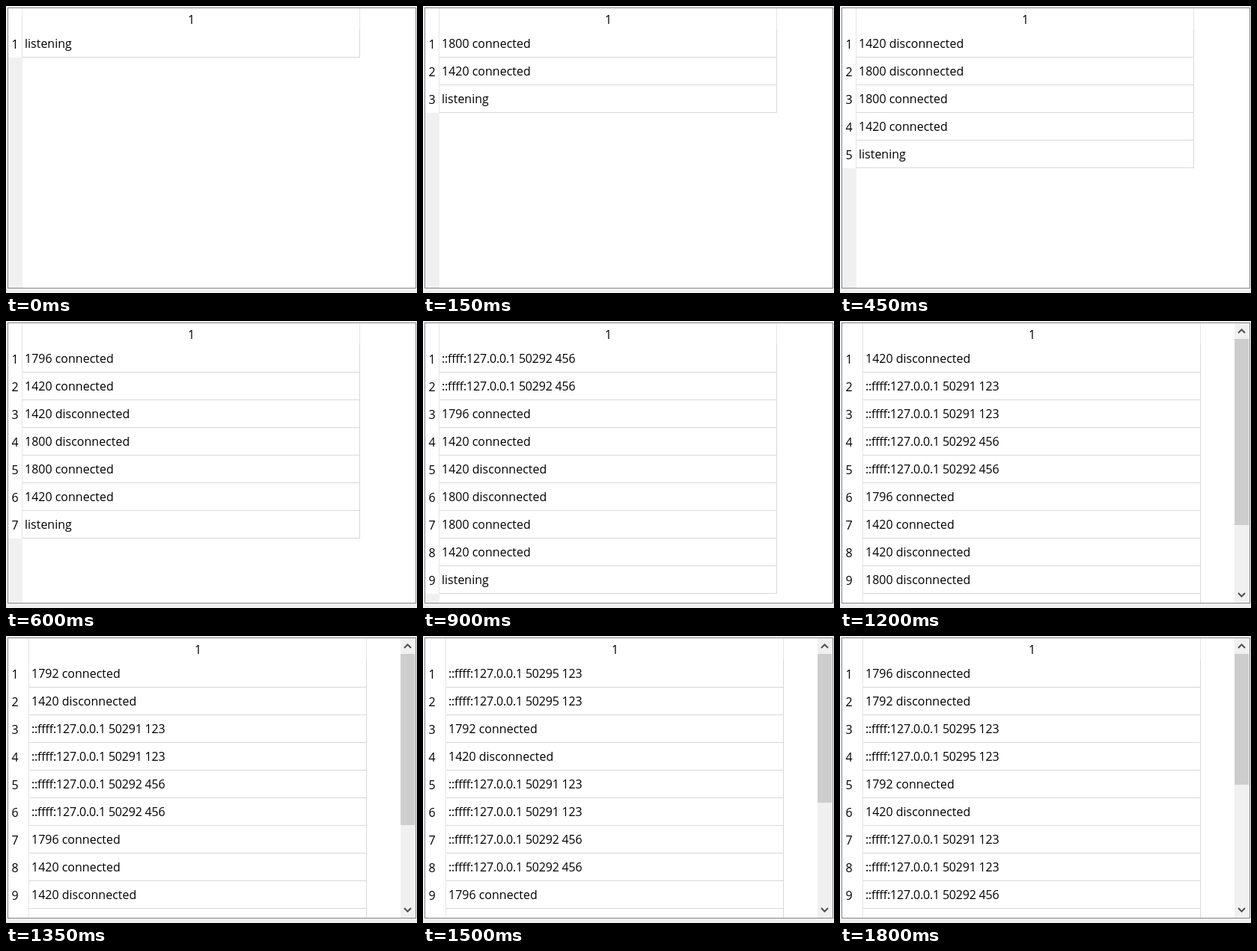
An HTML page that plays this animation: 549x384 px, repeating every 1850 ms.

```html
<!DOCTYPE html>
<html lang="en">
<head>
<meta charset="utf-8">
<title>Connection log</title>
<style>
  html, body { margin: 0; width: 100%; height: 100%; overflow: hidden; background: #f0f0f0; }
  svg { display: block; width: 549px; height: 384px; }
  text { font: 16px "Open Sans", "Noto Sans", sans-serif; fill: #000; white-space: pre; }
  .mid { text-anchor: middle; }
  .packet { letter-spacing: -.2px; }
  .grid { fill: #d8d8d8; }
  .edge { fill: #e5e5e5; }
  .arrow { fill: none; stroke: #505050; stroke-width: 2; }
</style>
</head>
<body>
<svg viewBox="0 0 549 384" shape-rendering="crispEdges">
  <clipPath id="view"><rect x="3" y="3" width="544" height="374"/></clipPath>
  <rect x="2" y="2" width="546" height="376" fill="#828790"/>
  <rect x="3" y="3" width="544" height="374" fill="#fff"/>
  <g clip-path="url(#view)">
    <rect id="gutter" x="3" width="19" height="374" fill="#f0f0f0"/>
    <g id="numbers"></g>
    <g id="table">
      <rect class="edge" id="left" x="21" y="3" width="1"/>
      <rect class="edge" x="472" y="3" width="1" height="29"/>
      <rect class="grid" id="right" x="472" y="32" width="1"/>
      <text class="mid" x="247.5" y="24">1</text>
      <g id="rows"></g>
    </g>
  </g>
  <g id="bar">
    <rect x="527" y="3" width="20" height="374" fill="#f0f0f0"/>
    <rect id="thumb" x="527" y="24" width="19" fill="#cdcdcd"/>
    <g shape-rendering="auto">
      <path class="arrow" d="M532 16l4.5-4.5 4.5 4.5"/>
      <path class="arrow" d="M532 364l4.5 4.5 4.5-4.5"/>
    </g>
  </g>
</svg>
<script>
const ROW = 37, TOP = 32, PAGE = 9, STEP = 150, LOOP = 1850;
const packet = (port, data) => `::ffff:127.0.0.1 ${port} ${data}`;
const log = [
  'listening',
  '1420 connected', '1800 connected',
  '1800 disconnected', '1420 disconnected',
  '1420 connected', '1796 connected',
  packet(50292, 456), packet(50292, 456),
  packet(50291, 123), packet(50291, 123),
  '1420 disconnected', '1792 connected',
  packet(50295, 123), packet(50295, 123),
  '1792 disconnected', '1796 disconnected'
];
// number of log entries after each step
const counts = [1, 3, 4, 5, 7, 7, 9, 10, 12, 13, 15, 16, 17];

const $ = id => document.getElementById(id);
const set = (el, attrs) => {
  for (const k in attrs) el.setAttribute(k, attrs[k]);
  return el;
};
const add = (parent, tag, attrs) =>
  parent.appendChild(set(document.createElementNS('http://www.w3.org/2000/svg', tag), attrs));

const rows = Array.from({ length: PAGE + 1 }, (_, i) => {
  const y = TOP + i * ROW;
  const num = add($('numbers'), 'text', { class: 'mid', x: 12, y: y + 25 });
  num.textContent = i + 1;
  const line = add($('rows'), 'rect', { class: 'grid', x: 22, y: y + ROW - 1, width: 451, height: 1 });
  const label = add($('rows'), 'text', { x: 25, y: y + 24 });
  return { num, line, label };
});

function draw(n) {
  const full = n > PAGE;
  const height = n * ROW;
  rows.forEach(({ num, line, label }, i) => {
    const shown = i < n;
    for (const el of [num, line, label]) el.style.display = shown ? '' : 'none';
    if (!shown) return;
    const text = log[n - 1 - i];
    label.textContent = text;
    set(label, { class: text[0] === ':' ? 'packet' : '' });
  });
  set($('table'), { transform: `translate(${full ? 9 : 0} 0)` });
  set($('gutter'), { y: TOP + height });
  set($('left'), { height: height + TOP - 3 });
  set($('right'), { height });
  $('bar').style.display = full ? '' : 'none';
  set($('thumb'), { height: Math.floor(332 * PAGE / n) });
}

const start = performance.now();
let last = 0;
function tick() {
  const t = (performance.now() - start) % LOOP;
  const n = counts[Math.floor(t / STEP)];
  if (n !== last) draw(last = n);
  requestAnimationFrame(tick);
}
tick();
</script>
</body>
</html>
```
